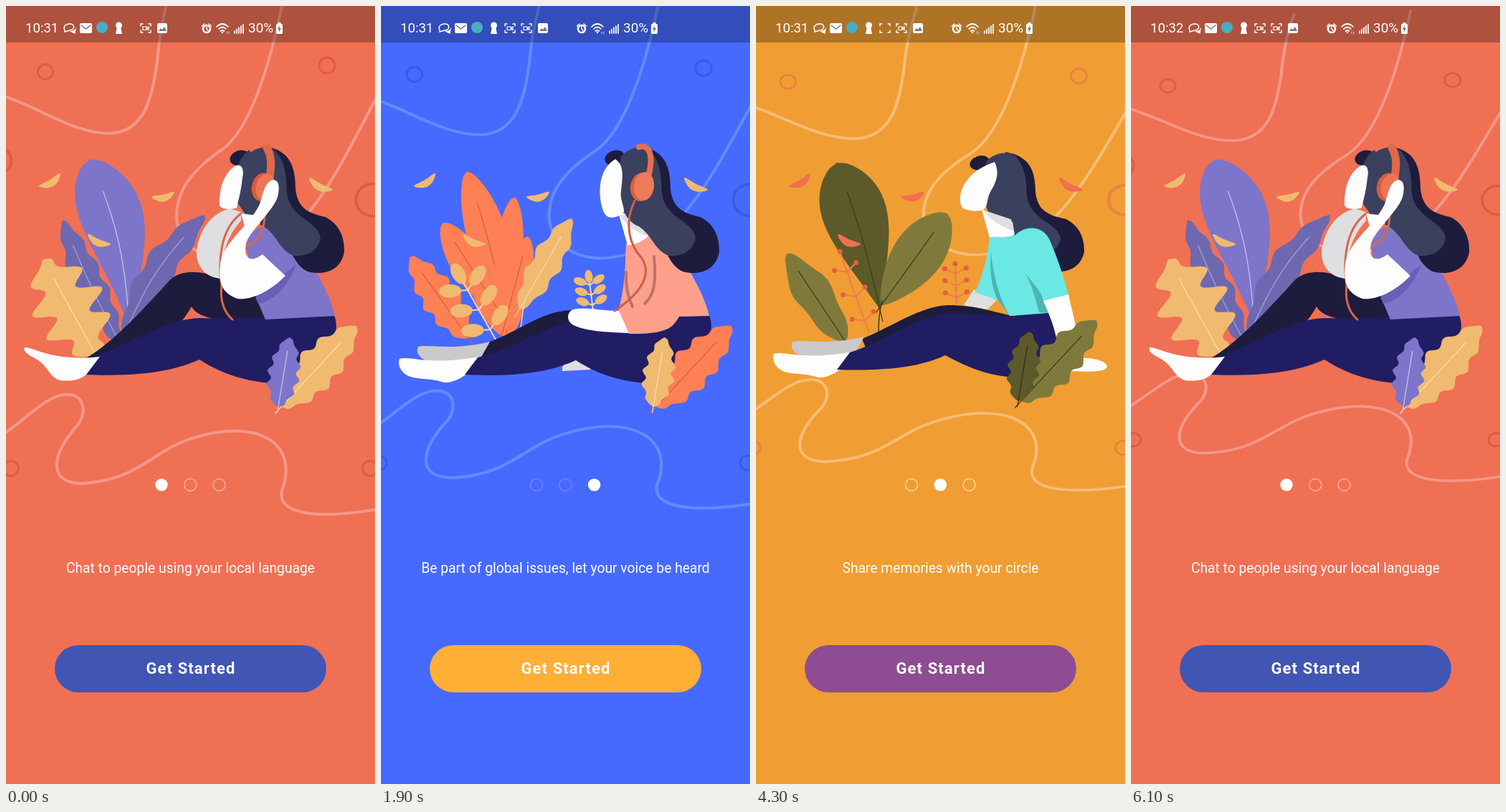
Recreate the animation shown at these times as an HTML page. Size 515x1087 px, loop 6200 ms.

```html
<!DOCTYPE html>
<html lang="en">
<head>
<meta charset="utf-8">
<style>
html, body { margin: 0; width: 100%; height: 100%; overflow: hidden; }
svg { display: block; width: 515px; height: 1087px; font-family: Roboto, sans-serif; }
</style>
</head>
<body>
<svg id="stage" viewBox="0 0 515 1087">
  <clipPath id="clip"><path id="wave"/></clipPath>
  <g id="pages"></g>
  <g id="dots"></g>
  <g id="status"></g>
</svg>
<script>
const $ = id => document.getElementById(id);
const W = 515, H = 1087, LOOP = 6200, { PI, sin, cos, max, min, hypot } = Math;
const NIGHT = '#1e1c3d', NAVY = '#211d63', SLATE = '#3a405e', WHITE = '#fdfdfe', GREY = '#dfdee0';
const SAND = '#f0ba70', CREAM = '#f8dfb5', LILAC = '#7d75c9', MAUVE = '#6d68b0', PALE = '#c5c0ea';
const CORAL = '#ff8055', RUST = '#d3603f', OLIVE = '#7f7a3c', MOSS = '#5c5a2a', BARK = '#3e3d1c';

// Drawing helpers
const fill = (color, d) => `<path fill="${color}" d="${d}"/>`;
const line = (color, width, d) =>
  `<path fill="none" stroke="${color}" stroke-width="${width}" stroke-linecap="round" d="${d}"/>`;
const oval = (color, x, y, rx, ry = rx, turn = 0) =>
  `<ellipse fill="${color}" rx="${rx}" ry="${ry}" transform="translate(${x} ${y}) rotate(${turn})"/>`;
const ring = (color, width, x, y, r) =>
  `<circle fill="none" stroke="${color}" stroke-width="${width}" cx="${x}" cy="${y}" r="${r}"/>`;
const text = (x, y, size, str, extra = '') =>
  `<text x="${x}" y="${y}" font-size="${size}" fill="#fff" ${extra}>${str}</text>`;
const group = (transform, content) => `<g transform="${transform}">${content}</g>`;

// Leaf from base to tip: bent axis, rounded width, wavy rim
function leaf(color, [x0, y0, x1, y1], half, { lobes = 0, depth = .16, skew = 1, bend = 0, vein } = {}) {
  const dx = x1 - x0, dy = y1 - y0, len = hypot(dx, dy), steps = 48;
  const at = (s, side) => {
    const rim = half * max(0, sin(PI * max(0, s) ** skew)) ** .6 * (1 + depth * sin(2 * PI * lobes * (s + .04 * side)));
    const off = bend * sin(PI * s) + side * rim;
    return `${(x0 + dx * s - dy / len * off).toFixed(1)} ${(y0 + dy * s + dx / len * off).toFixed(1)}`;
  };
  const trace = (from, to, side) => Array.from({ length: steps + 1 }, (_, i) => at(from + (to - from) * i / steps, side));
  return fill(color, 'M' + [...trace(0, 1, 1), ...trace(1, 0, -1)].join('L') + 'Z') +
    (vein ? line(vein, 1.3, 'M' + trace(-.08, .8, 0).join('L')) : '');
}

// Stem with pairs of ovals (or round berries) on short twigs
function sprig(stem, color, [x0, y0, x1, y1], reach, berry) {
  const len = hypot(x1 - x0, y1 - y0), ux = (x1 - x0) / len, uy = (y1 - y0) / len;
  const bud = (x, y, dx, dy) => berry ? oval(color, x, y, berry)
    : oval(color, x, y, reach * .42, reach * .72, Math.atan2(dy, dx) * 180 / PI + 90);
  let out = line(stem, 2, `M${x0} ${y0}L${x1} ${y1}`) + bud(x1, y1, ux, uy);
  for (let s = .15; s < .9; s += .3) for (const side of [-1, 1]) {
    const x = x0 + ux * len * s, y = y0 + uy * len * s;
    const dx = reach * (.5 * ux - side * uy), dy = reach * (.5 * uy + side * ux);
    out += line(stem, 2, `M${x} ${y}l${dx} ${dy}`) + bud(x + dx, y + dy, dx, dy);
  }
  return out;
}

// Parts shared by the pages
const backdrop = (lines, rings) => '<g class="drift">' +
  line(lines, 4, 'M-30 117L0 127C50 144 95 178 145 178C194 176 204 128 211 78C214 45 217 20 229 -20') +
  line(lines, 4, 'M390 -25C370 80 340 180 295 205C268 225 238 252 238 294C240 335 275 354 310 354C420 350 470 210 535 95') +
  line(lines, 4, 'M-30 614C25 585 50 546 82 543C106 541 114 561 102 583C60 630 60 666 105 667C185 664 205 620 260 604C350 575 410 610 385 677C377 715 450 718 545 698') +
  [[55, 92, 10.5], [448, 83, 11], [-11, 216, 18.5], [511, 271, 22.5], [7, 646, 10.5], [508, 646, 10.5]]
    .map(([x, y, r]) => ring(rings, r > 15 ? 4 : 3, x, y, r)).join('') + '</g>';

const hair =
  oval(NIGHT, 326, 212, 14, 10, -20) +
  fill(NIGHT, 'M362 196C395 202 404 222 404 255C407 285 425 290 446 295C464 304 473 322 472 344C467 368 448 376 425 372C395 366 380 300 362 196Z') +
  fill(SLATE, 'M335 210C350 194 372 194 379 206C391 222 391 240 392 262C397 298 437 300 439 325C435 342 421 350 402 349C382 342 380 322 360 308C340 300 333 278 334 255C337 240 332 225 335 210Z');

const frontLeaves = (big, bigVein, small, smallVein) =>
  leaf(big, [384, 560, 489, 447], 27, { lobes: 5, skew: .9, vein: bigVein }) +
  leaf(small, [380, 560, 396, 463], 20, { lobes: 5, skew: .9, vein: smallVein });

const petals = color => [[46, 252, 76, 234], [203, 267, 235, 260], [114, 319, 146, 333], [423, 240, 456, 257]]
  .map(axis => leaf(color, axis, 5, { bend: 5 })).join('');

const feet =
  fill('#cbc9ca', 'M52 476C65 472 100 482 152 469L138 494C110 497 80 497 62 495C51 490 49 482 52 476Z') +
  fill(WHITE, 'M26 493C40 488 65 503 137 490L117 516C108 522 98 527 88 526C65 518 45 524 32 513C24 505 24 497 26 493Z');

const musicPage = () =>
  leaf(LILAC, [172, 448, 118, 214], 44, { skew: 1.8, bend: 12, vein: PALE }) +
  leaf(MAUVE, [160, 473, 79, 299], 20, { lobes: 5, bend: -3, vein: '#a5a0da' }) +
  leaf(MAUVE, [162, 467, 277, 292], 21, { lobes: 4, skew: 1.1, bend: -12, vein: '#a5a0da' }) +
  leaf(SAND, [127, 490, 52, 354], 38, { lobes: 4, depth: .4, vein: CREAM }) +
  petals(SAND) +
  fill(NIGHT, 'M110 493C150 470 190 425 225 387C240 367 270 369 300 380L345 392L364 440L345 446C305 437 270 440 259 420C247 440 240 450 200 475Z') +
  fill(NAVY, 'M110 494C165 480 215 438 270 436C330 438 400 431 458 432C464 447 462 465 440 495C420 520 395 528 370 527C330 524 300 513 270 494C230 512 180 518 108 515Z') +
  fill(WHITE, 'M26 477C40 477 65 497 131 490L112 515C100 525 85 524 75 523C59 518 59 500 36 490C27 485 24 481 26 477Z') +
  fill(GREY, 'M313 283C280 290 266 325 266 348C268 368 282 380 301 381C300 345 310 320 328 300V288Z') +
  fill(LILAC, 'M334 331C340 314 355 306 370 307C390 320 405 355 435 375C447 398 455 415 459 433L362 438L350 410Z') +
  fill('#6860b4', 'M405 361C395 390 375 412 352 416L348 407Z') +
  hair + fill(SLATE, 'M340 201C318 214 318 250 323 275L344 305L370 270Z') +
  line('#d5694b', 3, 'M361 285C362 310 355 329 335 335M328 290C298 312 296 360 301 390C298 415 307 430 316 438') +
  line('#df694a', 11, 'M364 198C372 211 370 225 368 241') +
  oval('#d65c3e', 358, 253, 15, 20, 12) + oval('#ed7554', 362, 253, 13, 19, 12) +
  fill(WHITE, 'M318 225C328 218 333 227 330 240C328 260 324 272 322 282C312 285 301 284 298 279C297 258 303 235 318 225Z') +
  fill(WHITE, 'M328 290L346 292L355 304L334 311Z') +
  fill(WHITE, 'M372 243C382 242 382 255 379 267C373 286 340 314 335 332C331 352 340 360 358 347L390 377C365 402 340 411 323 409C298 400 297 382 299 360C303 330 340 307 354 277C359 261 361 247 372 243Z') +
  frontLeaves(SAND, CREAM, LILAC, PALE);

const voicePage = () =>
  leaf(CORAL, [176, 463, 150, 290], 40) +
  leaf(CORAL, [177, 463, 120, 231], 28, { skew: 1.3, bend: 6, vein: RUST }) +
  leaf(CORAL, [173, 440, 86, 303], 24, { skew: 1.3, vein: RUST }) +
  leaf(CORAL, [168, 440, 186, 267], 19, { skew: 1.3 }) +
  leaf(CORAL, [170, 455, 205, 322], 20, { skew: 1.2, vein: RUST }) +
  leaf(CORAL, [122, 464, 41, 350], 24, { lobes: 5, skew: .9, vein: RUST }) +
  leaf(SAND, [193, 424, 266, 297], 20, { lobes: 4, vein: '#f5d9a8' }) +
  line('#f5d9a8', 1.5, 'M200 412L195 450') +
  sprig('#f5d9a8', SAND, [160, 466, 108, 374], 22) +
  sprig('#f5d9a8', SAND, [296, 425, 290, 378], 13) +
  petals(SAND) +
  fill(GREY, 'M264 492L253 504V510L293 508L280 492Z') +
  fill(NIGHT, 'M152 469C190 456 225 425 268 425L310 450L160 492L137 490Z') +
  feet +
  fill(NAVY, 'M135 491C190 478 230 445 275 440C330 456 370 455 400 433L458 432C464 447 462 465 440 495C420 520 395 528 370 527C330 524 300 513 272 495C230 514 180 518 117 515Z') +
  fill('#ffa08d', 'M342 332L375 319C392 325 405 351 433 374C446 398 454 415 458 433L416 434C410 445 403 451 395 453C380 458 364 458 346 458L331 427C339 400 341 370 342 332Z') +
  line('#bd7368', 4, 'M342 372Q341 400 351 420M381 350C385 388 380 405 368 416') +
  fill(WHITE, 'M266 425C280 419 305 426 332 426L346 457C315 456 285 454 269 446C259 441 259 430 266 425Z') +
  fill(WHITE, 'M331 288L344 334C355 334 366 328 375 320L368 296Z') +
  fill(GREY, 'M333 292C342 305 358 318 373 322L368 290Z') +
  hair +
  fill(WHITE, 'M327 214C340 222 337 240 335 258C333 270 340 280 339 288C328 298 315 298 311 288C302 268 302 228 327 214Z') +
  line('#c9604a', 3, 'M354 272C338 305 348 335 363 351C380 375 362 402 326 426') +
  line('#e76f4f', 8, 'M360 197C377 192 380 214 373 238') +
  oval(RUST, 363, 253, 15, 20, 8) + oval('#ee7b5a', 367, 252, 14, 20, 8) +
  frontLeaves(CORAL, RUST, SAND, CREAM);

const circlePage = () =>
  leaf(MOSS, [173, 424, 113, 219], 45, { skew: 1.7, bend: 4, vein: BARK }) +
  leaf(OLIVE, [175, 418, 267, 290], 35, { skew: 1.25, vein: BARK }) +
  line(BARK, 1.5, 'M176 412Q171 430 171 456') +
  leaf(OLIVE, [125, 469, 43, 346], 25, { lobes: 2, depth: .1, vein: BARK }) +
  sprig('#ef7a50', '#e4603f', [158, 457, 117, 343], 16, 3.5) +
  sprig('#ef7a50', '#e4603f', [280, 416, 278, 360], 15, 3.5) +
  petals('#f0704f') +
  fill(GREY, 'M304 396L336 411L323 424L290 418Z') +
  fill(NIGHT, 'M148 465C190 448 230 419 268 418C310 418 330 428 360 433L300 460L155 482Z') +
  group('translate(-1 -7)', feet) +
  fill(NAVY, 'M131 484C180 469 220 433 270 430C310 427 335 437 365 432L409 428L430 435C444 470 430 515 365 519C325 517 300 507 264 488C225 507 170 510 113 508Z') +
  fill(WHITE, 'M399 412L436 402C441 428 455 470 448 492C470 491 490 496 490 504C487 513 460 511 425 509C424 480 417 440 399 412Z') +
  group('matrix(1 0 0 .945 -14 18.7)', hair) +
  fill(WHITE, 'M315 284L326 324C340 323 352 324 361 320L358 302Z') +
  fill(GREY, 'M317 285C325 298 345 310 360 314L356 298Z') +
  fill('#69e8e4', 'M326 323C340 321 352 325 362 320C376 306 400 306 410 327C420 350 430 380 436 403L401 412L408 429L354 433L338 411L306 400C315 380 324 350 326 323Z') +
  fill('#4fb4b0', 'M328 344C326 370 328 390 337 410L354 433C338 405 331 375 328 344ZM376 374C387 388 399 399 401 412L408 429L395 428C389 405 385 390 376 374Z') +
  fill(WHITE, 'M333 218C340 232 336 245 328 258C321 270 325 280 316 285C305 288 295 286 288 282C277 262 295 230 333 218Z') +
  group('translate(-14 -8)', frontLeaves(OLIVE, BARK, MOSS, '#33321a'));

const pages = [
  { color: '#f07054', lines: '#f2988a', rings: '#df5c3e', button: '#4156b3', dots: .45, dot: 0, title: 'Chat to people using your local language', art: musicPage },
  { color: '#466aff', lines: '#648bff', rings: '#3b5be0', button: '#ffae36', dots: .2, dot: 2, title: 'Be part of global issues, let your voice be heard', art: voicePage },
  { color: '#f09e33', lines: '#f4bd78', rings: '#e98240', button: '#8e4c93', dots: .6, dot: 1, title: 'Share memories with your circle', art: circlePage }
];

$('pages').innerHTML = pages.map(p => `<g><rect width="${W}" height="${H}" fill="${p.color}"/>` +
  backdrop(p.lines, p.rings) + p.art() + text(257.5, 792, 19.3, p.title, 'text-anchor="middle"') +
  `<rect x="68" y="893" width="379" height="66" rx="33" fill="${p.button}"/>` +
  text(258, 933, 22, 'Get Started', 'text-anchor="middle" font-weight="600" letter-spacing="1.1"') + '</g>').join('');
const layers = [...$('pages').children], drifting = document.querySelectorAll('.drift');

// Status bar
const corners = line('#fff', 1.4, 'M-7 -3V-6H-4M4 -6H7V-3M7 3V6H4M-4 6H-7V3');
const camera = line('#fff', 1.2, 'M-4 -2H1V2.5H-4ZM1 0L4 -2V2.5Z');
$('status').innerHTML = `<rect width="${W}" height="51" opacity=".27"/>` +
  text(27, 37, 18.6, '10:31', 'id="clock"') + text(338, 37, 19, '30%') +
  line('#fff', 1.5, 'M82 34C79 28 84 25 89 25C96 25 97 33 89 34L82 36Z') +
  fill('#fff', 'M89 35C95 35 98 32 97 29C99 33 96 35 97 39L92 37Z') +
  '<rect x="103" y="24" width="17" height="14" rx="2" fill="#fff"/>' +
  line('#777', 1.5, 'M105 27L111.5 32L118 27') + oval('#45aec4', 134, 30, 8) +
  oval('#fff', 157.5, 27, 4.5) + fill('#fff', 'M155 29H160L162 39H153Z') +
  group('translate(180 31)', `<g id="alert">${corners}<g id="camera">${camera}</g></g>`) +
  '<g id="alerts">' + group('translate(203 31)', corners + camera) +
  '<rect x="219" y="24" width="14" height="14" rx="2" fill="#fff"/>' + fill('#777', 'M221 35L224 31L226 33L229 29L232 35Z') + '</g>' +
  ring('#fff', 2.6, 280, 32, 5) + line('#fff', 1.6, 'M280 29V32L282 34M273.5 28L277 25M283 25L286.5 28') +
  line('#fff', 1.7, 'M294 29Q302 21 310 29M297 32Q302 27 307 32M299.5 35Q302 33 304.5 35') + oval('#fff', 302, 37, 1.3) +
  line('#ccc', 1, 'M308 36V39M311 36V39') +
  [0, 1, 2, 3, 4].map(i => line('#fff', 1.7, `M${319 + i * 3} 38V${35 - i * 2.3}`)).join('') +
  '<rect x="377" y="25" width="9" height="14" rx="1.5" fill="#fff"/><rect x="379.5" y="23" width="4" height="3" fill="#fff"/>' +
  fill('#777', 'M382 27L379 33H381L380.5 37L384 31H382Z');

// Liquid edge: start time, centre, extra side width, bulge and height factors
const swipes = [
  { start: 700, cy: 577, side: 43, bulge: .655, spread: .83 },
  { start: 2900, cy: 550, side: 0, bulge: .89, spread: 1.03 },
  { start: 4600, cy: 546, side: 0, bulge: .955, spread: .97 }
];

// Short drag, then a steady release
const progress = t => t < 200 ? t * .0009 : min(1, .18 + (t - 200) * .00111);

function edge(p, { cy, side, bulge, spread }) {
  const x = 858 * (p - .19) + side * (1 - p), u = (p - .4) / .6;
  // The bulge grows linearly, then springs back past the edge
  const peak = x + bulge * (p < .4 ? 15 + 992 * p : 412 * Math.exp(-2.04 * u) * cos(4.67 * u));
  const r = spread * (133 + 2600 * min(p, .4)), a = .49 * r, b = .274 * r;
  return `M-400 -2000H${x}V${cy - r}C${x} ${cy - a} ${peak} ${cy - b} ${peak} ${cy}` +
    `C${peak} ${cy + b} ${x} ${cy + a} ${x} ${cy + r}V3000H-400Z`;
}

function draw(t) {
  const turn = t * PI / 6800;
  const sx = 1 + .035 * sin(turn), sy = (1 + .0583 * cos(turn)) / 1.0583;
  drifting.forEach(g => g.setAttribute('transform', `translate(371 273.5) scale(${sx} ${sy}) translate(-371 -273.5)`));

  const index = swipes.filter(s => t >= s.start).length;
  const swipe = swipes[index - 1], p = swipe ? progress(t - swipe.start) : 1;
  const next = index % 3, last = (index + 2) % 3, moving = p < 1;
  layers.forEach((g, i) => {
    g.style.display = i === next || (moving && i === last) ? '' : 'none';
    g.removeAttribute('clip-path');
  });
  if ($('pages').lastChild !== layers[next]) $('pages').append(layers[next]);
  if (moving) {
    $('wave').setAttribute('d', edge(p, swipe));
    layers[next].setAttribute('clip-path', 'url(#clip)');
  }

  const page = pages[p > .5 ? next : last];
  $('dots').innerHTML = [0, 1, 2].map(i => {
    const x = 217 + i * 40.3;
    return i === page.dot ? oval('#fff', x, 669, 8.7) : ring(`rgba(255,255,255,${page.dots})`, 1.5, x, 669, 8.5);
  }).join('');

  const slide = max(0, min(1, (t - 100) / 300));
  $('alert').setAttribute('opacity', slide);
  $('alerts').setAttribute('transform', `translate(${-8 * (1 - slide)} 0)`);
  $('camera').style.display = t > 3400 && t < 5300 ? 'none' : '';
  $('clock').textContent = t < 5500 ? '10:31' : '10:32';
}

const begin = performance.now();
(function tick() {
  draw((performance.now() - begin) % LOOP);
  requestAnimationFrame(tick);
})();
</script>
</body>
</html>
```
